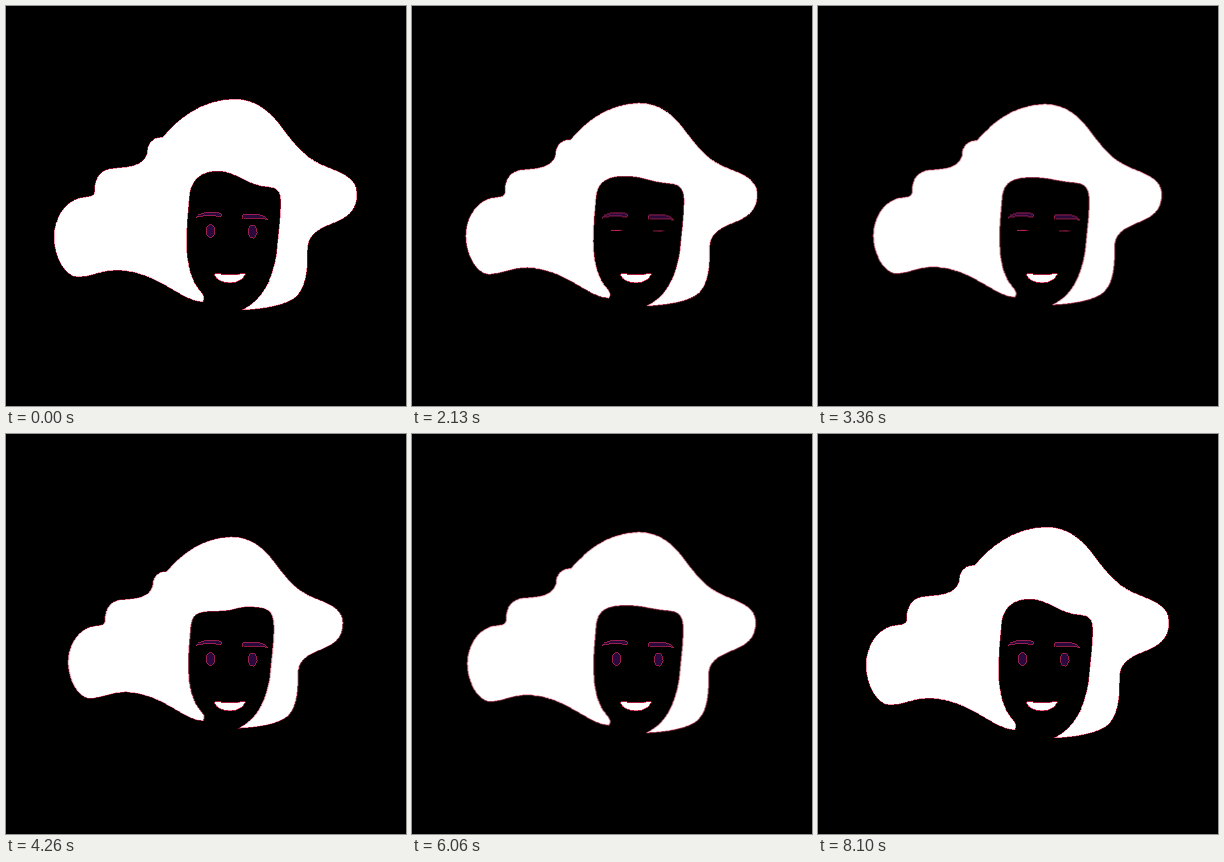
An HTML page for the animation above (8130 ms loop, 400 by 400 pixels).

```html
<!DOCTYPE html>
<html lang="en">
<head>
<meta charset="utf-8">
<title>Flowing hair</title>
<style>
  html, body { margin: 0; width: 100%; height: 100%; overflow: hidden; background: #000; }
  svg { display: block; width: 100vw; height: 100vh; shape-rendering: crispEdges; }

  .hair {
    fill: #fff;
    stroke: #f02850;
    stroke-width: .5;
    transform-origin: 199.5px 198.5px;
    animation: sway 8130ms infinite cubic-bezier(.333, 0, .667, 1);
  }
  .eye, .brow { fill: #2a0a3c; stroke: #c82858; stroke-width: .7; }
  .eye {
    vector-effect: non-scaling-stroke;
    transform-box: fill-box;
    transform-origin: center 46%;
    animation: blink 8130ms infinite ease-in-out;
  }
  .brow { animation: frown 8130ms infinite ease-in-out; }
  .mouth { fill: #fff; stroke: #f02850; stroke-width: .7; }

  /* Three swells of 2700 ms, then a 30 ms rest */
  @keyframes sway {
    0%, 33.21%, 66.421%, 99.631%, 100% {
      transform: scale(1);
      d: path("M228 93C250 93 264 106 274 119S296 150 314 158S351 170 351 188S340 212 325 218S301.500 230 301.500 244S302 277 291 290C280 300 256 303 236 304C257 294 266 274 270.500 248C272 230 274.800 212 274.800 196C274.800 186 272 182 263 181C241 180 230 165 212 165C195 165 185 174 183.500 190C182 207 180.600 220 180.600 237C180.600 259 186 277 195 286C198 289 199 292 197 296C174 295 153 266 112 264C95 264 85 271 72 271S48 250 48 231S60 192 80 191C91 190 88 187 89 179C91 167 99 162 111 162C123 161 137 160 141 148C141 138 146 131 157 131C172 113 195 94 228 93Z");
    }
    16.605%, 49.815%, 83.026% {
      transform: scale(.9);
      d: path("M228 93C250 93 264 106 274 119S296 150 314 158S351 170 351 188S340 212 325 218S301.500 230 301.500 244S302 277 291 290C280 300 256 303 236 304C257 294 266 274 270.500 248C272 230 274.800 212 275 196C275 180 273 171 257 170C235 167 236 175 214 175.500C195 176 186 175 183.500 190C182 207 180.600 220 180.600 237C180.600 259 186 277 195 286C198 289 199 292 197 296C174 295 153 266 112 264C95 264 85 271 72 271S48 250 48 231S60 192 80 191C91 190 88 187 89 179C91 167 99 162 111 162C123 161 137 160 141 148C141 138 146 131 157 131C172 113 195 94 228 93Z");
    }
  }
  @keyframes blink {
    0%, 18.5%, 51.7%, 100% { transform: scaleY(1); }
    20.5%, 49.8% { transform: scaleY(.04); }
  }
  @keyframes frown {
    0%, 18.5%, 51.7%, 100% { transform: translateY(0); }
    20.5%, 49.8% { transform: translateY(.4px); }
  }
</style>
</head>
<body>
<svg viewBox="0 0 400 400">
  <path class="hair" d="M228 93"/>
  <path class="brow" d="M189.5 211C195 206 207 205 215 207.5Q217 209 214.5 210.5C206 209 198 209.5 189.5 211Z"/>
  <path class="brow" d="M236.5 208.5C246 207.5 257 207.5 262 213.5C254 211.5 246 212 237.5 212.5Q235 210.5 236.5 208.5Z"/>
  <ellipse class="eye" cx="204.5" cy="225" rx="4.5" ry="6.5"/>
  <ellipse class="eye" cx="246.5" cy="225.5" rx="4.5" ry="6.5"/>
  <path class="mouth" d="M208.5 267.5Q224 270.5 239 267.5C238 273 232 276.700 224 276.700C215 276.700 209 273 208.500 267.500Z"/>
</svg>
</body>
</html>
```
